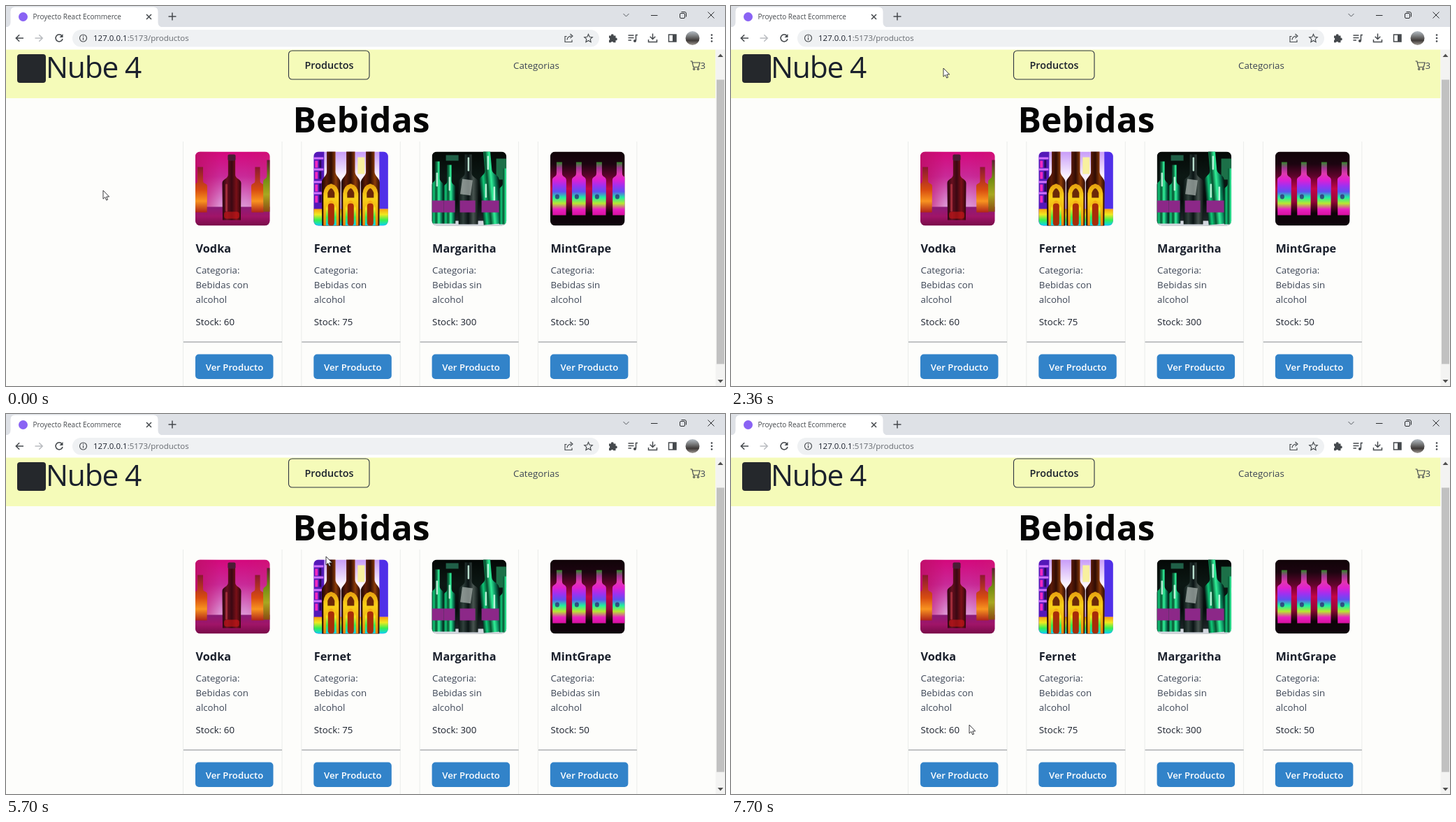
Write an HTML page that moves like this. It is 1029 by 544 pixels and loops after 8000 ms.

```html
<!DOCTYPE html>
<html lang="es">
<head>
<meta charset="utf-8">
<title>Proyecto React Ecommerce</title>
<style>
  html, body { margin: 0; width: 100%; height: 100%; overflow: hidden; background: #fdfdfb; }
  svg { display: block; }
  text { font-family: "Open Sans", "Noto Sans", sans-serif; fill: #1a202c; white-space: pre; }
  .line { fill: none; stroke: #45494d; stroke-width: 1.5; }
  .thin { fill: none; stroke: #2b2d30; stroke-width: 1; }
  .fine { stroke-width: 1.15; }
  .dark { fill: #45494d; }
  .small { font-size: 13.3px; }
  .soft { fill: #3d4656; }
  .name { font-size: 16.3px; font-weight: 700; }
  .buy { fill: #3283c9; }
  .buy.over { fill: #2e74b5; }
  .label { font-size: 13.2px; font-weight: 600; fill: #fff; text-anchor: middle; }
</style>
</head>
<body>
<svg width="1029" height="544" viewBox="0 0 1029 544">
  <defs>
    <clipPath id="round"><rect width="106.5" height="106" rx="7"/></clipPath>
    <g id="grads"></g>
  </defs>

  <!-- browser frame -->
  <rect width="1029" height="31" fill="#dee1e6"/>
  <rect y="30" width="1029" height="32.5" fill="#fff"/>
  <path d="M0 30.5Q6.5 30 6.5 23V8Q6.5 1.5 13 1.5H211Q217.5 1.5 217.5 8V23Q217.5 30 224 30.5Z" fill="#fff"/>
  <circle cx="24.5" cy="15.5" r="6.5" fill="#8a63f4"/>
  <text x="38.5" y="19" font-size="10" class="dark">Proyecto React Ecommerce</text>
  <g class="line">
    <path d="M201 12l7 7m0-7l-7 7M232.5 15h11m-5.5-5.5v11"/>
    <path d="M25 46H14.5m4.7-4.8L14.3 46l4.9 4.8"/>
    <path d="M41.5 46H52m-4.7-4.8L52.2 46l-4.9 4.8" stroke="#b9bcc0"/>
    <path d="M80 42.7A5 5 0 1 0 81 47"/>
  </g>
  <path d="M81.5 40v5h-5z" class="dark"/>
  <g class="thin">
    <path d="M883.5 11l4 4 4-4" stroke="#55595e"/>
    <path d="M923 13.5h9.5M1004.5 8.500l9 9m0-9l-9 9"/>
    <rect x="964.5" y="10.5" width="7" height="7" rx="1.5"/>
    <path d="M966.5 8.500h4.500q2.500 0 2.500 2.500v4.500"/>
  </g>
  <rect x="95" y="34" width="754" height="24.5" rx="12.25" fill="#eff1f3"/>
  <g class="line">
    <g class="fine">
      <circle cx="110.5" cy="46" r="5"/>
      <path d="M110.5 45v3.8M110.5 42.6v1.3"/>
      <path d="M802.5 43.5H800v8h10v-3M803 48.5q.5-5 6-5.5M807.5 40l3.5 3-3.5 3"/>
      <path d="M833.5 40.5l1.7 3.8 4.1.4-3.1 2.7.9 4.1-3.6-2.1-3.6 2.1.9-4.1-3.1-2.700 4.100-.4z"/>
    </g>
    <path d="M890.5 42h8M890.5 45.5h8M890.5 49h4.5M901.5 49.5v-8h2.5"/>
    <path d="M925.5 39.5v8m-3.8-3.8l3.8 3.8 3.8-3.8M919.5 48v3.5h12V48"/>
    <rect x="948.5" y="41" width="10.5" height="10"/>
  </g>
  <g class="dark">
    <path d="M863 42.5h3a1.8 1.8 0 1 1 3.5 0h3v3.2a1.8 1.8 0 1 1 0 3.5v3h-3.3a1.7 1.7 0 0 0-3.3 0H863v-3.300a1.7 1.7 0 0 0 0-3.300z"/>
    <circle cx="900" cy="50" r="2"/>
    <path d="M954 41h5v10h-5z"/>
    <circle cx="1010" cy="41.5" r="1.3"/><circle cx="1010" cy="46" r="1.3"/><circle cx="1010" cy="50.5" r="1.3"/>
  </g>
  <circle cx="982.5" cy="46" r="10" fill="url(#avatar)"/>
  <text x="125" y="50" font-size="11.5">127.0.0.1<tspan fill="#666a70">:5173/productos</tspan></text>

  <!-- page -->
  <rect y="62.5" width="1015.5" height="481.5" fill="#fdfdfb"/>
  <rect y="62.5" width="1015.5" height="69.500" fill="#f5fbb9"/>
  <rect x="16" y="69" width="41" height="41" rx="4" fill="#25282c"/>
  <text x="57" y="102.5" font-size="42.5" letter-spacing="-1.2">Nube 4</text>
  <rect x="404.5" y="64" width="115.5" height="41" rx="5" fill="none" stroke="#2d3440" stroke-width="1.1"/>
  <text x="462.5" y="90" font-size="14.4" font-weight="600" text-anchor="middle">Productos</text>
  <text x="726" y="90" class="small soft">Categorias</text>
  <g class="line fine">
    <path d="M979.5 79h2.300l2 8.500h7.500l1.700-6.500h-10.500"/>
    <circle cx="984.7" cy="90.3" r="1.2"/><circle cx="990.5" cy="90.3" r="1.2"/>
  </g>
  <text x="993.5" y="90" class="small soft">3</text>
  <text x="508.5" y="181" font-size="49.8" font-weight="700" text-anchor="middle" style="fill:#050505">Bebidas</text>
  <g id="cards"></g>

  <!-- scrollbar -->
  <rect x="1015.5" y="62.5" width="13.5" height="481.5" fill="#f3f3f2"/>
  <rect x="1017" y="105.5" width="11" height="407" fill="#c1c1c1"/>
  <path d="M1018.5 73h8l-4-4.5zM1018.5 535h8l-4 4.5z" fill="#505050"/>

  <g id="cursor" fill="#fff" stroke="#26282b" stroke-linejoin="round">
    <path id="arrow" stroke-width=".9" d="M0 0V12.2L2.8 9.6 4.7 14 6.6 13.2 4.8 9H8.7Z"/>
    <path id="hand" d="M-1.5 1Q-1.5-.5 0-.5 1.5-.5 1.5 1V6Q4 5.5 4.3 7 6.5 6.6 6.8 8 8.3 8 8.3 9.5V12Q8.3 14 7 16V18H-.5V16.5L-4.6 11Q-5.6 9-4 8.8-2.8 8.8-1.5 11Z"/>
  </g>
</svg>
<script>
const $ = id => document.getElementById(id);

const stops = colors => colors.map((c, i) =>
  `<stop offset="${i / (colors.length - 1)}" stop-color="${c}"/>`).join('');
const down = (id, ...colors) => `<linearGradient id="${id}" x2="0" y2="1">${stops(colors)}</linearGradient>`;
const across = (id, ...colors) => `<linearGradient id="${id}">${stops(colors)}</linearGradient>`;
const rect = (x, y, w, h, fill, more = '') =>
  `<rect x="${x}" y="${y}" width="${w}" height="${h}" fill="${fill}" ${more}/>`;

// Bottle: centre x, top y, body width, height; neck width and neck length as shares.
function bottle(x, y, w, h, fill, neck = .34, length = .27, more = '') {
  const n = w * neck / 2, b = w / 2, s = y + h * length, e = s + h * .13;
  const side = k => `${x + k * b} ${y + h}`;
  return `<path fill="${fill}" ${more} d="M${x - n} ${y}H${x + n}V${s}C${x + n} ${s + 6} ${x + b} ${e - 6} ${x + b} ${e}` +
    `L${side(.96)}H${x - b * .96}L${x - b} ${e}C${x - b} ${e - 6} ${x - n} ${s + 6} ${x - n} ${s}Z"/>`;
}

$('grads').innerHTML =
  down('avatar', '#b4bcc4', '#7d7f80', '#3f3a38', '#a09a94') +
  down('wall', '#d4087c', '#c82a98', '#d884cc', '#f0d0f0') +
  across('haze', '#c0106c', '#c0106c00', '#c0106c00', '#d0207060') +
  down('table', '#8a1c78', '#a01468', '#780c48') +
  down('amber', '#8a1830', '#b03024', '#d84c10', '#f89420', '#b02418') +
  down('olive', '#5a2030', '#6c8a10', '#a8a820', '#8a4a10') +
  across('ruby', '#2a0610', '#681020', '#3a0812', '#7a1018', '#30060c') +
  down('room', '#c89cf8', '#fbf4ff', '#e4c8fc', '#8440e8') +
  across('brown', '#1c0604', '#5c1c08', '#300c04', '#8c3c08', '#2c0a04') +
  down('label', '#e8a010', '#f8d018', '#f0b010', '#f08008') +
  down('glow', '#f8a010', '#f0e820', '#38f050', '#08d0f8') +
  down('night', '#040806', '#0c1814', '#060c0c', '#242c30') +
  across('green', '#042018', '#10c878', '#085030', '#30f098', '#0a8058', '#021410') +
  across('smoke', '#081412', '#30403c', '#0a1414', '#485450', '#0c1614') +
  down('stage', '#100408', '#1c0410', '#60042c', '#c40448', '#980438', '#0c0408', '#10040c') +
  down('pink', '#308828', '#a03890', '#e038b0', '#e020d0', '#a030f0', '#6050f0', '#20f0a0', '#b8e830', '#e820c0', '#d810a0');

const vodka = rect(0, 0, 107, 106, 'url(#wall)') + rect(0, 0, 107, 80, 'url(#haze)') +
  rect(0, 79, 107, 27, 'url(#table)') +
  bottle(7, 22, 20, 65, 'url(#amber)', .4, .3) + bottle(89, 22, 18, 65, 'url(#amber)', .4, .3) +
  bottle(106, 12, 18, 74, 'url(#olive)', .4, .3) + bottle(52, 5, 27, 93, 'url(#ruby)', .38, .3) +
  rect(46.5, 4, 11, 9, '#4a1c34', 'rx="2"') + rect(43, 46, 3, 40, '#c8404c', 'rx="1.5" opacity=".6"') +
  rect(41, 86, 22, 10, '#d41818', 'rx="4" opacity=".6"');

const shelf = y => rect(0, y, 14, 3, '#d070ff') + rect(2, y + 5, 4, 10, '#f028c0') + rect(8, y + 4, 3, 11, '#280858');
const fernetBottle = x => bottle(x, -8, 27, 116, 'url(#brown)', .46, .32) +
  `<path d="M${x - 11} 106V60Q${x - 10} 48 ${x} 46 ${x + 10} 48 ${x + 11} 60V106Z" fill="url(#label)"/>` +
  `<path d="M${x - 5} 66V59Q${x} 46 ${x + 5} 59V66Z" fill="#6a2808"/>` +
  `<path d="M${x - 7.5} 106V80Q${x} 60 ${x + 7.5} 80V106Z" fill="url(#glow)"/>` +
  rect(x - 4.5, 74, 9, 32, '#a82c08', 'rx="4"');
const fernet = rect(0, 0, 107, 106, 'url(#room)') + rect(0, 0, 15, 106, '#5418b8') +
  [8, 24, 42, 58].map(shelf).join('') + rect(63, 8, 10, 24, '#f8f0a0') +
  rect(94, 0, 13, 82, '#5030e8') + rect(0, 82, 107, 24, 'url(#glow)') +
  [25, 53, 81].map(fernetBottle).join('');

const margaritha = rect(0, 0, 107, 106, 'url(#night)') + rect(20, 5, 18, 8, '#206048') +
  rect(92, 10, 15, 30, '#1c7048') + rect(0, 99, 107, 7, '#d4d8e0') +
  bottle(25, 19, 18, 84, 'url(#green)') + bottle(8, 14, 18, 89, 'url(#green)') +
  bottle(52, 4, 29, 100, 'url(#smoke)') +
  rect(42, 40, 15, 22, '#a4aeaa', 'opacity=".75" transform="rotate(8 50 50)"') +
  bottle(83, -2, 28, 106, 'url(#green)', .36, .27, 'transform="rotate(-5 84 52)"') +
  bottle(104, 24, 16, 80, 'url(#green)') +
  [[0, 17], [17, 16], [40, 22], [71, 25]].map(([x, w]) => rect(x, 70, w, 17, '#8c2888')).join('') +
  [[6, 30], [24, 36], [51, 8], [79, 6], [76, 46], [88, 50]].map(([x, y]) =>
    rect(x, y, 2.5, 20, '#d4ffec', 'rx="1" opacity=".85"')).join('');

const mintGrape = rect(0, 0, 107, 106, 'url(#stage)') +
  [13, 41, 70, 99].map(x => bottle(x, 15, 20, 76, 'url(#pink)', .4, .21) +
    rect(x - 6, 61, 6, 7, '#301c70', 'rx="3" opacity=".7"')).join('');

const cards = [
  ['Vodka', 'con', 60, vodka], ['Fernet', 'con', 75, fernet],
  ['Margaritha', 'sin', 300, margaritha], ['MintGrape', 'sin', 50, mintGrape]
];
const cardX = i => 271 + i * 169.3;

$('cards').innerHTML = cards.map(([name, kind, stock, photo], i) => `
  <g transform="translate(${cardX(i)} 0)">
    <path d="M-17.5 194V544M124 194V544" stroke="#eaecea"/>
    <path d="M-17 481H124" stroke="#85898e"/>
    <g transform="translate(0 208.5)" clip-path="url(#round)">${photo}</g>
    <text y="353" x=".5" class="name">${name}</text>
    <g class="small">
      <text y="383" x=".5" class="soft">Categoria:</text>
      <text y="404" x=".5" class="soft">Bebidas ${kind}</text>
      <text y="425" x=".5" class="soft">alcohol</text>
      <text y="457" x=".5">Stock: ${stock}</text>
    </g>
    <rect class="buy" y="498.5" width="111.5" height="35.5" rx="5"/>
    <text class="label" x="56" y="521.5">Ver Producto</text>
  </g>`).join('');

// Pointer path: time, x, y. Equal times make a jump.
const path = [
  [0, 139, 264], [1170, 139, 264], [1400, 170, 211], [1430, 170, 211], [1530, 186, 190],
  [2070, 186, 190], [2360, 304, 89], [2400, 304, 89], [2560, 352, 92],
  [2680, 352, 92], [2960, 411, 101], [3270, 411, 101], [3430, 454, 92],
  [3740, 454, 92], [3820, 448, 166], [3900, 453, 93],
  [4930, 453, 93], [4930, 481, 94], [5460, 481, 94], [5460, 465, 178],
  [5700, 465, 178], [5700, 458, 204], [5760, 458, 204], [6030, 740, 119],
  [6470, 740, 119], [6700, 360, 506], [6730, 360, 506], [7100, 345, 513],
  [7440, 345, 513], [7700, 341, 445], [8000, 341, 445]
];
const loop = 8000;
const buys = [...document.querySelectorAll('.buy')];
const inside = (x, y, l, t, w, h) => x >= l && x <= l + w && y >= t && y <= t + h;

function pointer(t) {
  const i = path.findLastIndex(k => k[0] <= t);
  const [t0, x0, y0] = path[i], [t1, x1, y1] = path[i + 1];
  const p = (t - t0) / (t1 - t0);
  return [x0 + (x1 - x0) * p, y0 + (y1 - y0) * p].map(Math.round);
}

function draw(now) {
  const [x, y] = pointer(now % loop);
  let link = inside(x, y, 404, 64, 116, 41);
  buys.forEach((b, i) => {
    const over = inside(x, y, cardX(i), 498, 112, 36);
    b.classList.toggle('over', over);
    link = link || over;
  });
  $('cursor').setAttribute('transform', `translate(${x} ${y})`);
  $('arrow').style.display = link ? 'none' : '';
  $('hand').style.display = link ? '' : 'none';
}

function tick() {
  draw(performance.now());
  requestAnimationFrame(tick);
}
tick();
</script>
</body>
</html>
```
